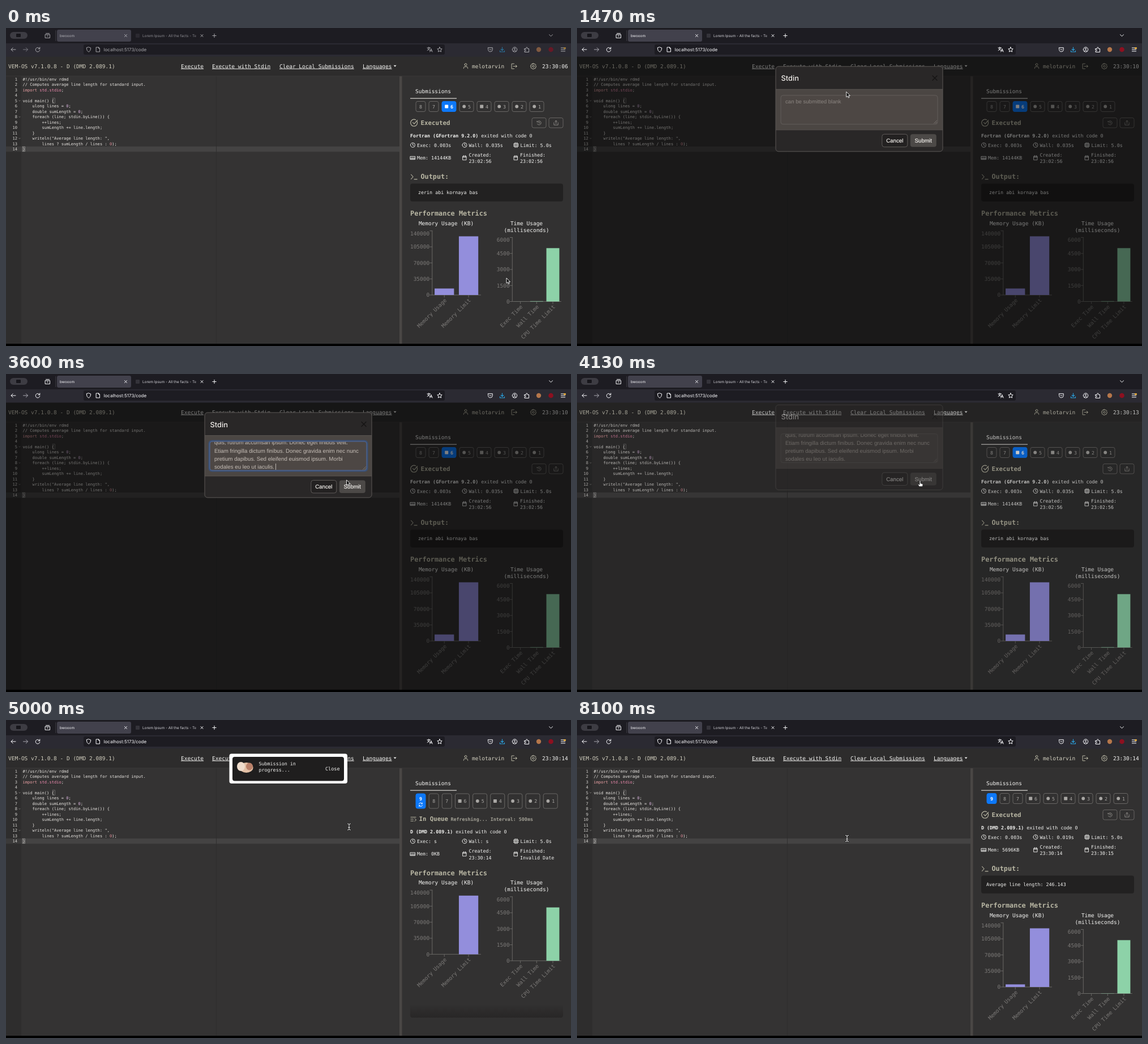
These frames come from a looping animation (998x561 px, 8.13 s). An HTML page:

```html
<!DOCTYPE html>
<html lang="en">
<head>
<meta charset="utf-8">
<title>Code runner</title>
<style>
html, body { margin: 0; width: 100%; height: 100%; overflow: hidden; background: #000; }
svg { display: block; width: 100vw; height: 100vh; }
text { white-space: pre; text-rendering: geometricPrecision; font-family: "DejaVu Sans Mono", "Liberation Mono", monospace; }
.ui { font-family: Inter, "Liberation Sans", sans-serif; }
.form { font-family: "Liberation Sans", Arial, sans-serif; }
.title { font-family: Inter, "Liberation Sans", sans-serif; font-weight: 500; }
.firm { stroke: #f0ede9; stroke-width: .2; }
.b { font-weight: 700; }
.link { text-decoration: underline; }
.end { text-anchor: end; }
.mid { text-anchor: middle; }
</style>
</head>
<body>
<svg id="stage" viewBox="0 0 998 561" preserveAspectRatio="none"></svg>
<script>
const LOOP = 8130, OPEN = 1185, PASTE = 2300, BLUR = 3950, HIDE = 4045, QUEUED = 4570, DONE = 5870;
const LIGHT = '#f4f4f2', HEAD = '#b9b7a4', DIM = '#7c7a78';

// Drawing helpers
const text = (x, y, s, size, fill = LIGHT, cls = '', more = '') =>
  `<text x="${x}" y="${y}" font-size="${size}" fill="${fill}" class="${cls}" ${more}>${s}</text>`;
const rect = (x, y, w, h, fill, r = 0, more = '') =>
  `<rect x="${x}" y="${y}" width="${w}" height="${h}" rx="${r}" fill="${fill}" ${more}/>`;
const icon = (x, y, d, color = LIGHT, w = 1) =>
  `<path transform="translate(${x} ${y})" d="${d}" fill="none" stroke="${color}" stroke-width="${w}" stroke-linecap="round" stroke-linejoin="round"/>`;
const dot = (x, y, r, fill) => `<circle cx="${x}" cy="${y}" r="${r}" fill="${fill}"/>`;
const ring = r => `M${-r} 0a${r} ${r} 0 1 0 ${2 * r} 0a${r} ${r} 0 1 0 ${-2 * r} 0`;
const group = (id, body, more = '') => `<g id="${id}" ${more}>${body}</g>`;
const outline = (color, w = 1) => `stroke="${color}" stroke-width="${w}"`;

const SHAPE = {
  clock: ring(4) + 'M0-2.4V0L1.8 1',
  chip: 'M-3-3H3V3H-3ZM-1.3-1.3H1.3V1.3H-1.3ZM-1.5-4.4V-3M1.5-4.4V-3M-1.5 3V4.4M1.5 3V4.4M-4.4-1.5H-3M-4.4 1.5H-3M3-1.5H4.4M3 1.5H4.4',
  memory: 'M-4.2-2.6H4.2V2.6H-4.2ZM-2.4-.8V.6M0-.8V.6M2.4-.8V.6M-4 1.6H4',
  calendar: 'M-3-3H3V3.6H-3ZM-3-1.2H3M-1.5-4.2V-2.6M1.5-4.2V-2.6',
  cross: 'M-2-2L2 2M-2 2L2-2',
  refresh: 'M-3-1A3 3 0 0 1 2.6-1.6M2.8-3.2V-1.4H1M3 1A3 3 0 0 1-2.6 1.6M-2.8 3.2V1.4H-1'
};

// Browser frame
function browser() {
  const line = '#fbfbfe';
  return rect(0, 0, 998, 27, '#1d1c22') + rect(0, 27, 998, 23.5, '#2b2a32') +
    rect(90, 3, 131, 21, '#42414c', 3) + rect(87.5, 4, .7, 19, '#4a4950') +
    rect(137, 29, 638, 18, '#1d1c22', 3) + rect(7, 7, 31, 12, '#3d3c43', 6) +
    rect(18, 10, 8, 6, '#17161b', 1) +
    group('lively',
      icon(73.5, 13.5, 'M-4-2H4V4H-4ZM-3-4H3M-1.2.5H1.2', line) +
      text(95, 16, 'bwooom', 6.4, line, 'ui') + icon(211.5, 13.5, SHAPE.cross, line) +
      text(241, 16, 'Lorem Ipsum - All the facts - Te', 6.4, '#d5d4da', 'ui') +
      rect(229, 10, 7, 7, '#34333a', 1) +
      rect(332, 8, 9, 12, 'url(#tabFade)') + icon(346, 13.5, SHAPE.cross, line) +
      icon(368, 13.5, 'M-3.2 0H3.2M0-3.2V3.2', line) + icon(962.5, 13, 'M-3-1.3L0 1.6L3-1.3', line) +
      icon(13, 38, 'M4 0H-4M-.8-3.2L-4 0L-.8 3.2', line) +
      icon(34.5, 38, 'M-4 0H4M.8-3.2L4 0L.8 3.2', '#aaa9b2') +
      icon(56, 38, 'M3.4-1.6A3.8 3.8 0 1 0 3.8 1M3.8-4V-1.2H1', line) +
      icon(146, 38, 'M0-4.2L3.8-2.8Q3.8 2.4 0 4.4Q-3.8 2.4-3.8-2.8Z', line) +
      icon(162.5, 38, 'M-3-4H1L3-2V4H-3ZM1-4V-2H3', line) +
      text(172.5, 41, 'localhost:5173/code', 8, line, 'ui') +
      icon(748.5, 38, 'M-4.5-3H1M-1.8-4.3V-3M0-3Q-1 .5-4.3 1.6M-3.4-2Q-2 .8 0 1.4M.2 4L2.4-1.4L4.6 4M1 2.2H3.8', line) +
      icon(766, 38, 'M0-4.2L1.3-1.4L4.2-1.1L2 1L2.6 4L0 2.5L-2.6 4L-2 1L-4.2-1.1L-1.3-1.4Z', line) +
      icon(855.5, 38, 'M-3.8-3.3H3.8V0A3.8 3.8 0 0 1-3.8 0ZM-1.7-.8L0 .9L1.7-.8', line) +
      icon(876.5, 38, 'M0-4V1.6M-2.4-.7L0 1.7L2.4-.7M-4 2V4H4V2', '#2aa8e8', 1.1) +
      icon(898.5, 38, ring(4.2) + 'M-2.6 3.1Q0-.4 2.6 3.1M-1.2-1.3a1.2 1.2 0 1 0 2.4 0a1.2 1.2 0 1 0-2.4 0', line) +
      icon(920, 38.5, 'M-4-2H-1.3V-3.2A1.2 1.2 0 0 1 1.2-3.2V-2H3.6V4H-4V1.8H-2.8A1 1 0 0 0-2.8-.2H-4Z', line) +
      dot(941, 38, 4.2, '#b5764a') + dot(962.5, 38, 4.3, '#8d1020') +
      icon(984, 38, 'M-3.6-3H3.6M-3.6 0H3.6M-3.6 3H3.6', line) + rect(985, 34, 4, 3, '#e3a93a', 1)) +
    rect(0, 557, 998, 4, '#000');
}

function header() {
  const link = (x, s) => text(x, 70.6, s, 9.53, LIGHT, 'link');
  return rect(0, 50, 998, 35, '#2d2c2c') + rect(0, 84.5, 998, .8, '#3c3a3a') +
    text(4, 70.6, 'VEM-OS v7.1.0.8 - D (DMD 2.089.1)', 9.5, '#d3d0c0') +
    rect(356.5, 56, 118.5, 23, '#5a534f', 4, 'id="hover" opacity="0"') +
    link(309, 'Execute') + link(364, 'Execute with Stdin') +
    link(483, 'Clear Local Submissions') + link(630, 'Languages') +
    '<path d="M684.6 65.8H689.6L687.1 68.6Z" fill="#f4f4f2"/>' +
    icon(812, 67, 'M-2-2.4a2 2 0 1 0 4 0a2 2 0 1 0-4 0M-3.6 4.4V3.2Q-3.4 1.2-1 1.2H1Q3.4 1.2 3.6 3.2V4.4', HEAD) +
    text(823, 70.6, 'melotarvin', 9.5, '#d3d0c0') +
    icon(897.5, 67.5, 'M0-4.4H-4.4V4.4H0M-1.4 0H5M2.8-2.2L5 0L2.8 2.2', HEAD) +
    icon(931.5, 67.5, ring(1.7) + 'M-1-5H1L1.5-3.5L3.1-4L4.6-2.4L3.7-1.1L5 0L4.8 1.4L3.5 1.7L3.9 3.4L2.4 4.4L1.1 3.6L.4 5H-1.2L-1.7 3.6L-3.2 4L-4.5 2.5L-3.6 1.2L-5 .4V-1L-3.6-1.4L-4-3L-2.6-4.2L-1.4-3.5Z', HEAD) +
    text(947, 70.6, '', 9.53, LIGHT, '', 'id="time"');
}

// Parts may carry a colour after "|"
const CODE = [
  [0, '#!/usr/bin/env rdmd'],
  [0, '// Computes average line length for standard input.'],
  [0, 'import |#eaa0a4', 'std.stdio|#f08bb0', ';'],
  [0, ''],
  [0, 'void main() {'],
  [1, 'ulong lines = ', '0|#d9b3de', ';'],
  [1, 'double sumLength = ', '0|#d9b3de', ';'],
  [1, 'foreach (line; stdin.byLine()) {'],
  [2, '++lines;'],
  [2, 'sumLength += line.length;'],
  [1, '}'],
  [1, 'writeln("Average line length: ",'],
  [2, 'lines ? sumLength / lines : ', '0|#e08f9a', ');'],
  [0, '}']
];

function editor() {
  let out = rect(0, 85, 695, 472, '#343333') + rect(0, 85, 27, 472, '#2e2d2d') +
    rect(27, 209, 668, 9.3, '#444343') + rect(0, 209, 27, 9.3, '#3b3a3a') +
    rect(371, 85, 1, 472, '#2f2e2e') +
    rect(82.2, 123.8, 4.2, 8.8, 'none', 0, outline('#8a8886', .6)) +
    rect(29.6, 209.2, 4, 8.6, 'none', 0, outline('#b0aeac', .6));
  CODE.forEach(([indent, ...parts], i) => {
    const y = 93 + i * 9.49;
    const spans = parts.map(p => {
      const [s, color = 'e9e6e2'] = p.split('|#');
      return `<tspan fill="#${color}">${s}</tspan>`;
    }).join('');
    out += text(20, y, i + 1, 7.08, '#d6d4d0', 'end') + text(29.5 + indent * 17.06, y, spans, 7.084);
    if ([4, 7, 11].includes(i)) out += icon(24, y - 2.6, 'M-1.2-.6L0 .7L1.2-.6', '#8a8886', .7);
  });
  return out;
}

// Right side: one block per state of the run
function run(id, r) {
  const dy = r.out ? 0 : 7.3, tall = r.out ? 18 : 26, top = r.out ? 129.5 : 130;
  let out = '', x = 724;
  for (let n = r.count; n; n--) {
    const w = n > 6 ? 17 : 25, on = n === r.active, mid = top + tall / 2;
    const color = on ? '#fff' : '#a9a7a4', digitY = on && !r.out ? mid - 1 : mid + 3;
    out += rect(x, top, w, tall, on ? '#0d78f8' : 'none', 3, outline(on ? '#0d78f8' : '#696765'));
    out += text(x + (n > 6 ? w / 2 : 17.6), digitY, n, 8.3, color, 'mid' + (on ? ' b' : ''));
    if (n === 6 || n === 4) out += rect(x + 5.2, mid - 3, 6, 6, color, .8);
    else if (n < 6) out += dot(x + 8.2, mid, 2.9, color);
    if (on && !r.out) out += icon(x + w / 2, mid + 6.3, SHAPE.refresh, '#fff', .9);
    x += w + 6 + (r.out ? 0 : .15);
  }
  const item = (ix, y, shape, lines) => icon(ix + 4.5, y - 3, SHAPE[shape], LIGHT, .9) +
    lines.map((s, i) => text(ix + 12, y + (lines.length > 1 ? i * 11.7 - 5.6 : 0), s, 8.33)).join('');
  let info = r.out
    ? icon(721, 167.3, 'M5-2.8A6 6 0 1 1 2.4-5.4M-2.4-.6L0 1.8L5.6-4.6', HEAD, 1.2) +
      text(732.5, 171.2, 'Executed', 10.8, HEAD, 'b') +
      rect(929, 158.5, 25, 17.5, 'none', 3, outline('#666462')) +
      rect(959, 158.5, 25, 17.5, 'none', 3, outline('#666462')) +
      icon(941.5, 167.3, 'M-2.6-2.2A3.5 3.5 0 1 1-3 1.8M-3.6-3V-1.4H-2M0-1.6V.4H1.4', '#96948f', .9) +
      icon(971.5, 167.3, 'M0 1.4V-4M-2-2.2L0-4.2L2-2.2M-3.6-.4V3.8H3.6V-.4', '#96948f', .9)
    : icon(719.5, 167.5, 'M-4.5-3.4H4.5M-4.5 0H0M-4.5 3.4H0M2.2-1L5.2 1.4L2.2 3.8', HEAD) +
      text(729.5, 171.2, 'In Queue', 10.7, HEAD, 'b') +
      text(785.5, 170.6, 'Refreshing... Interval: 500ms', 8.33, '#a3a196', 'b');
  info += text(714, 192.6, `<tspan class="b">${r.lang}</tspan> exited with code 0`, 8.33) +
    item(714, 209.5, 'clock', [`Exec: ${r.exec}`]) + item(805.5, 209.5, 'clock', [`Wall: ${r.wall}`]) +
    item(896.5, 209.5, 'chip', ['Limit: 5.0s']) + item(714, 232.2, 'memory', [`Mem: ${r.mem}KB`]) +
    item(805.5, 232.2, 'calendar', ['Created:', r.created]) +
    item(896, 232.2, 'calendar', ['Finished:', r.finished]);
  out += `<g transform="translate(0 ${dy})">${info}</g>`;
  out += r.out
    ? icon(720.5, 262.5, 'M-5-4L-1.4 0L-5 4M.6 4.4H5.6', HEAD, 1.1) +
      text(732.5, 266.2, 'Output:', 11.8, HEAD, 'b') +
      rect(714, 274.5, 270, 31.5, '#222121', 4) + text(723, 293, r.out, 8.36)
    : rect(714, 501, 270, 24, 'url(#cardEdge)', 4);
  return group(id, out);
}

function chart(x0, x1, base, step, max, names, color, ids) {
  const band = (x1 - x0) / names.length, w = band * .8, top = base - step * 4;
  let out = icon(0, 0, `M${x0} ${top}V${base}H${x1}`, '#6a6866', 1);
  for (let i = 0; i < 5; i++) {
    const y = base - i * step;
    out += icon(x0, y, 'M-4 0H0', '#6a6866') +
      text(x0 - 4.7, y + (i === 4 ? 7.8 : 3.3), max / 4 * i, 9.45, DIM, 'end');
  }
  names.forEach((name, i) => {
    const cx = x0 + band * (i + .5), x = cx + 4.5, y = base + 10;
    out += icon(cx, base, 'M0 0V4', '#6a6866') + rect(cx - w / 2, base, w, 0, color, 0, `id="${ids[i]}"`) +
      text(x, y, name, 9.5, DIM, 'end', `transform="rotate(-45 ${x} ${y})"`);
  });
  return out;
}

function panel() {
  const mem = '#938edc', cpu = '#8dd2a8';
  return rect(695, 85, 303, 472, '#323131') + rect(695, 85, 4.5, 472, '#4a4745') +
    text(723, 115, 'Submissions', 9.53) + rect(714, 123.6, 82, 1.1, '#e8e6e2') +
    run('before', { count: 8, active: 6, lang: 'Fortran (GFortran 9.2.0)', exec: '0.003s', wall: '0.035s', mem: 14144,
      created: '23:02:56', finished: '23:02:56', out: ' zerin abi kornaya bas' }) +
    run('queue', { count: 9, active: 9, lang: 'D (DMD 2.089.1)', exec: 's', wall: 's', mem: 0,
      created: '23:30:14', finished: 'Invalid Date' }) +
    run('after', { count: 9, active: 9, lang: 'D (DMD 2.089.1)', exec: '0.003s', wall: '0.019s', mem: 5696,
      created: '23:30:14', finished: '23:30:15', out: 'Average line length: 246.143' }) +
    group('charts',
      text(714, 331.3, 'Performance Metrics', 11.9, HEAD, 'b') +
      text(777.5, 348, 'Memory Usage (KB)', 9.5, LIGHT, 'mid') +
      text(919.5, 348, 'Time Usage', 9.5, LIGHT, 'mid') + text(919.5, 359.6, '(milliseconds)', 9.5, LIGHT, 'mid') +
      chart(752.8, 838.5, 471, 28.3, 140000, ['Memory Usage', 'Memory Limit'], mem, ['mem', 'memMax']) +
      chart(894.3, 980.3, 482.5, 28.25, 6000, ['Exec Time', 'Wall Time', 'CPU Time Limit'], cpu, ['exec', 'wall', 'cpuMax']));
}

const LOREM = ['quis, rutrum accumsan ipsum. Donec eget finibus velit.',
  'Etiam fringilla dictum finibus. Donec gravida enim nec nunc',
  'pretium dapibus. Sed eleifend euismod ipsum. Morbi', 'sodales eu leo ut iaculis.'];

function modal() {
  return rect(351, 68, 295, 150, '#292727', 5) + rect(351, 108, 295, 72, '#4b4643') +
    rect(351, 108, 295, .8, '#5c5754') + rect(351, 179.6, 295, .8, '#5c5754') +
    rect(351, 68, 295, 150, 'none', 5, outline('#5c5856')) +
    text(360.5, 93.5, 'Stdin', 12.9, '#f0ede9', 'title') + icon(632, 88.5, 'M-4-4L4 4M-4 4L4-4', '#151414', 1.3) +
    rect(360, 119, 277, 51, '#4d4744', 4, outline('#625d5a')) +
    group('focus',
      rect(358.6, 117.6, 279.8, 53.8, 'none', 5, outline('rgba(13,110,253,.25)', 2.4)) +
      rect(360, 119, 277, 51, 'none', 4, outline('#46659c'))) +
    group('hint', text(368, 133.6, 'can be submitted blank', 9.6, '#8b8580', 'form')) +
    group('lorem', LOREM.map((s, i) => text(368, 124.4 + i * 14.2, s, 9.74, '#c6beb7', 'form')).join(''), 'clip-path="url(#area)"') +
    rect(476, 158, .8, 11, '#d8d2cc', 0, 'id="caret"') + rect(631, 145, 4, 15, '#b4b0ad', 2, 'id="thumb"') +
    icon(633, 166, 'M-2.5 2.5L2.5-2.5M.5 2.5L2.5.5', '#8f8a86', .7) +
    rect(538.8, 187.5, 45, 22.5, '#232121', 4, outline('#5f5b59')) +
    rect(588.8, 187.5, 46, 22.5, '#4c4947', 4) +
    text(561.3, 202.2, 'Cancel', 9.65, '#f0ede9', 'form mid firm') + text(611.8, 202.2, 'Submit', 9.75, '#f0ede9', 'form mid firm');
}

function toast() {
  return rect(394.5, 59.5, 208.5, 52.5, '#fff', 4) + rect(400, 65, 197, 42.5, '#1f1e1e', 4) +
    '<ellipse cx="424.5" cy="84" rx="12" ry="9" fill="#e2bfa4"/>' +
    '<ellipse cx="415" cy="82" rx="7" ry="8" fill="#efdccb"/><ellipse cx="430" cy="82" rx="6" ry="6.5" fill="#b98069"/>' +
    text(446.5, 79.6, 'Submission in', 8.36) + text(446.5, 91.4, 'progress...', 8.36) + text(564, 88.9, 'Close', 8.5);
}

const BEAM = 'M-2.6-5.6Q0-5.6 0-4V4Q0 5.6-2.6 5.6M2.6-5.6Q0-5.6 0-4M0 4Q0 5.6 2.6 5.6M-1.4 1H1.4';
const pointer = () =>
  group('arrow', '<path d="M0 0V9.4L2.1 7.4L3.6 10.6L5.2 9.9L3.7 6.8H6.6Z" fill="#0c0c0c" stroke="#fff" stroke-width=".9"/>') +
  group('hand', '<path d="M-.9 1a.9.9 0 0 1 1.8 0V4.4l3 .8q1.2.4 1 1.8l-.7 3H-1.5L-3.6 6.6q.1-1.3 1.4-.6l1.3 1Z" fill="#fff" stroke="#111" stroke-width=".6"/>') +
  group('beam', icon(0, 0, BEAM, '#161616', 2.1) + icon(0, 0, BEAM, '#f2f2f2', 1));

document.getElementById('stage').innerHTML =
  `<defs>
    <clipPath id="area"><rect x="361" y="119.8" width="275" height="49.6"/></clipPath>
    <linearGradient id="tabFade"><stop stop-color="#1d1c22" stop-opacity="0"/><stop offset="1" stop-color="#1d1c22"/></linearGradient>
    <linearGradient id="cardEdge" x2="0" y2="1"><stop stop-color="#282626" stop-opacity="0"/><stop offset="1" stop-color="#282626"/></linearGradient>
  </defs>` +
  editor() + panel() + header() + rect(0, 50, 998, 507, '#000', 0, 'id="shade"') +
  group('modal', modal()) + group('toast', toast()) + browser() + group('pointer', pointer());

// Motion
const el = {};
document.querySelectorAll('[id]').forEach(e => el[e.id] = e);
const show = (id, on) => el[id].style.display = on ? '' : 'none';
const fade = (id, a) => { el[id].setAttribute('opacity', a); show(id, a > 0); };
const move = (id, x, y) => el[id].setAttribute('transform', `translate(${x} ${y})`);
const ramp = (t, from, len) => Math.min(1, Math.max(0, (t - from) / len));
const smooth = p => p * p * (3 - 2 * p);
const easeOut = p => 1 - (1 - p) ** 1.7;

const PATH = [[30, 884, 441], [830, 447.5, 67], [1290, 447.5, 67], [1630, 499, 150], [2900, 499, 150], [3700, 606, 188.5],
  [7140, 606, 188.5], [7170, 594, 188], [7530, 536, 181], [7700, 536, 181], [7830, 489, 215], [8070, 489, 215], [8100, 477, 209]];

function where(t) {
  const i = PATH.findIndex(k => k[0] > t);
  if (i === 0) return PATH[0].slice(1);
  if (i < 0) return PATH[PATH.length - 1].slice(1);
  const [a, ax, ay] = PATH[i - 1], [b, bx, by] = PATH[i];
  const raw = (t - a) / (b - a), p = a === 7170 ? easeOut(raw) : smooth(raw);
  return [ax + (bx - ax) * p, ay + (by - ay) * p];
}

const inside = (x, y, l, t, r, b) => x > l && x < r && y > t && y < b;
function cursorKind(x, y, modalUp) {
  if (modalUp) {
    if (inside(x, y, 360, 119, 637, 170)) return 'beam';
    return inside(x, y, 538, 187, 635, 211) ? 'hand' : 'arrow';
  }
  if (inside(x, y, 356, 56, 475, 79)) return 'hand';
  return inside(x, y, 0, 85, 695, 557) ? 'beam' : 'arrow';
}

function bar(id, base, value, scale) {
  el[id].setAttribute('y', base - value * scale);
  el[id].setAttribute('height', value * scale);
}

function draw(t) {
  const [x, y] = where(t), kind = cursorKind(x, y, t > 1290 && t < HIDE + 300);
  move('pointer', x, y);
  ['arrow', 'hand', 'beam'].forEach(k => show(k, k === kind));

  el.lively.setAttribute('opacity', t < 30 ? .62 : 1);
  el.time.textContent = '23:30:' + (t < 30 ? '06' : t < 870 ? '09' : t < 3730 ? '10' : t < QUEUED ? '13' : '14');
  fade('hover', ramp(t, 740, 100) * (1 - ramp(t, 1290, 150)));

  const seen = ramp(t, OPEN, 150) - ramp(t, HIDE, 150);
  const drop = t < HIDE ? easeOut(ramp(t, OPEN, 300)) : 1 - easeOut(ramp(t, HIDE, 300));
  fade('shade', seen * .5);
  fade('modal', seen);
  move('modal', 0, -31 * (1 - drop));
  const pasted = t >= PASTE;
  fade('focus', ramp(t, 1720, 150) - ramp(t, BLUR, 100));
  show('hint', !pasted);
  show('lorem', pasted);
  show('caret', t >= 1730 && t < BLUR);
  el.caret.setAttribute('x', pasted ? 476 : 368);
  el.caret.setAttribute('y', pasted ? 158 : 125);
  fade('thumb', pasted ? 1 - ramp(t, 2900, 300) : 0);

  const queued = t >= QUEUED && t < DONE;
  show('before', t < QUEUED);
  show('queue', queued);
  show('after', t >= DONE);
  move('charts', 0, queued ? -57.7 : 0);
  const left = 1 - smooth(ramp(t, QUEUED, 400)), grown = smooth(ramp(t, DONE, 400));
  const memScale = 113.2 / 140000, timeScale = 113 / 6000;
  bar('mem', 471, 14144 * left + 5696 * grown, memScale);
  bar('memMax', 471, 128000, memScale);
  bar('exec', 482.5, 3 * (left + grown), timeScale);
  bar('wall', 482.5, 35 * left + 19 * grown, timeScale);
  bar('cpuMax', 482.5, 5000, timeScale);

  const shown = easeOut(ramp(t, QUEUED + 30, 370)) - smooth(ramp(t, 7180, 330));
  fade('toast', Math.min(1, shown * 1.4));
  move('toast', 0, -64 * (1 - shown));
}

const start = performance.now();
function tick() {
  draw((performance.now() - start) % LOOP);
  requestAnimationFrame(tick);
}
tick();
</script>
</body>
</html>
```
